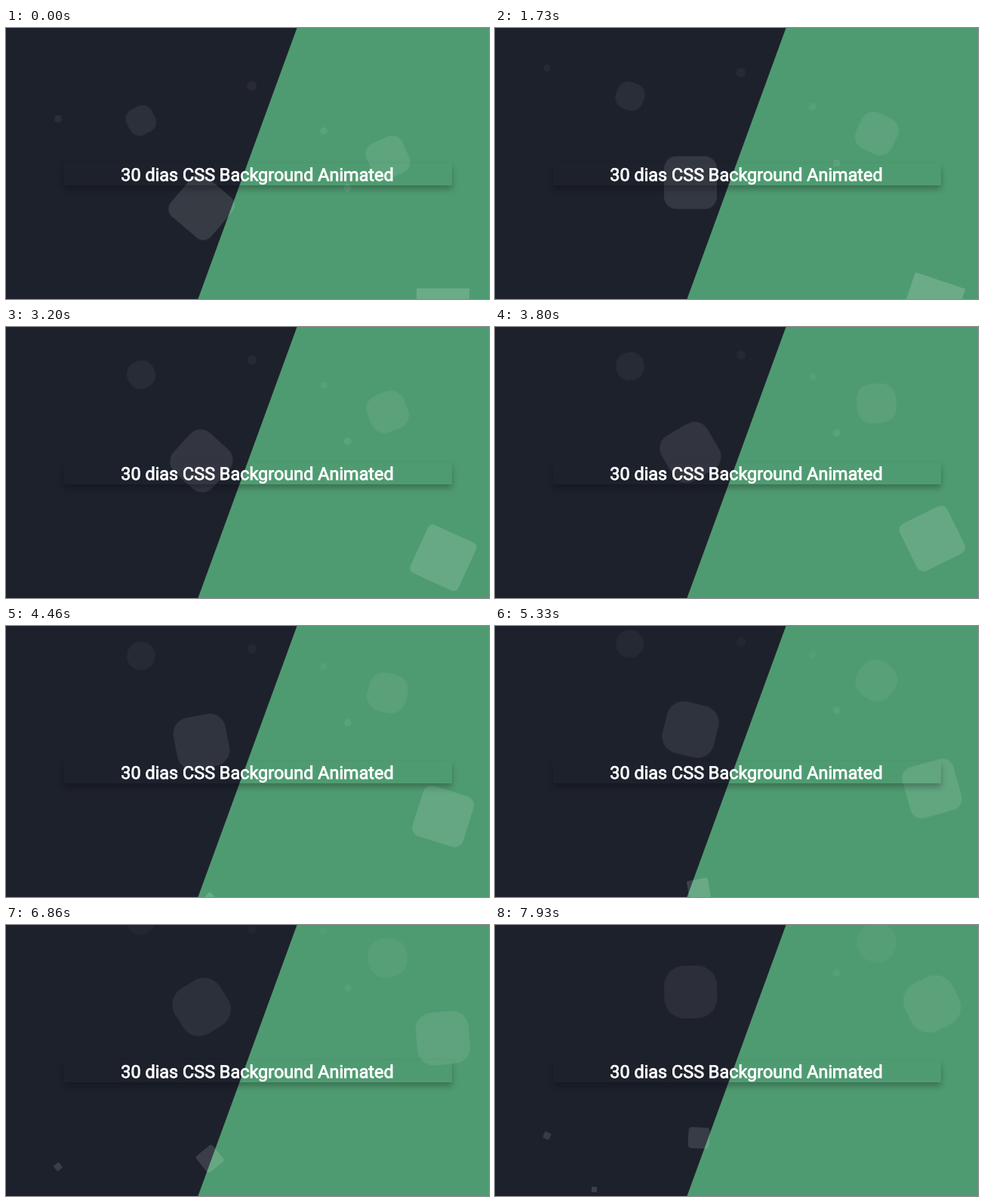
Animation of 640 by 360 pixels, one loop 8000 ms. Source, as an HTML page:

```html
<!DOCTYPE html>
<html lang="pt">
<head>
<meta charset="utf-8">
<title>30 dias CSS</title>
<style>
  html, body { margin: 0; width: 100%; height: 100%; overflow: hidden; }
  #stage {
    position: absolute; left: 0; top: 0; width: 640px; height: 360px;
    overflow: hidden;
    background: linear-gradient(110deg,
      #1d212c calc(50% - .6px), #4f9b71 calc(50% + .6px));
  }
  #stage i {
    position: absolute; display: block;
    background: rgba(255, 255, 255, .16);
    will-change: transform;
  }
  h1 {
    position: absolute; left: 77px; top: 180px; width: 512px; height: 29px;
    margin: 0; padding-right: 2px;
    box-shadow: 0 5px 8px rgba(0, 0, 0, .27);
    font: 400 23.43px/30px Roboto, sans-serif;
    -webkit-text-stroke: .85px #fff;
    text-rendering: geometricPrecision;
    color: #fff; text-align: center; white-space: nowrap;
  }
</style>
</head>
<body>
<div id="stage"><h1>30 dias CSS Background Animated</h1></div>
<script>
const LOOP = 8000, FPS = 15;
const UNIT = 640 / 1366;   // page pixels to stage pixels
const FLOOR = 416.3;       // bottom edge of a square at launch
const RISE = 1000 * UNIT;  // distance climbed in one life
const START = 14.65;       // seconds already played when the loop begins

// at: left in %, size: page pixels, wait and life: seconds
const squares = [
  { at: 25, size: 80 },
  { at: 65 },
  { at: 70, wait: 4 },
  { at: 75, size: 110, wait: 3 },
  { at: 35, size: 150, wait: 7 },
  { at: 10, wait: 7.2, life: 12 },
  { at: 40, size: 60, wait: 18, life: 18 },
  { at: 20, size: 15, wait: 18, life: 35 },
  { at: 85, size: 150, wait: 16.1, life: 11 },
  { at: 50, size: 25, wait: -17.4, life: 45 }
];

const stage = document.getElementById('stage');
const title = stage.querySelector('h1');

function addSquare({ at, size = 20, wait = 0, life = 25 }) {
  const el = document.createElement('i');
  const side = size * UNIT;
  el.style.left = at + '%';
  el.style.top = FLOOR - side + 'px';
  el.style.width = el.style.height = side + 'px';
  stage.insertBefore(el, title);

  return sec => {
    const p = Math.max(0, START + sec - wait) % life / life;
    el.style.transform = `translateY(${-RISE * p}px) rotate(${720 * p}deg)`;
    el.style.borderRadius = Math.min(50, 62 * p) + '%';
    el.style.opacity = 1 - p;
  };
}

const movers = squares.map(addSquare);

function tick() {
  const sec = (performance.now() % LOOP) / 1000;
  const held = Math.floor((sec + .007) * FPS) / FPS;
  movers.forEach(move => move(held));
  requestAnimationFrame(tick);
}
tick();
</script>
</body>
</html>
```
